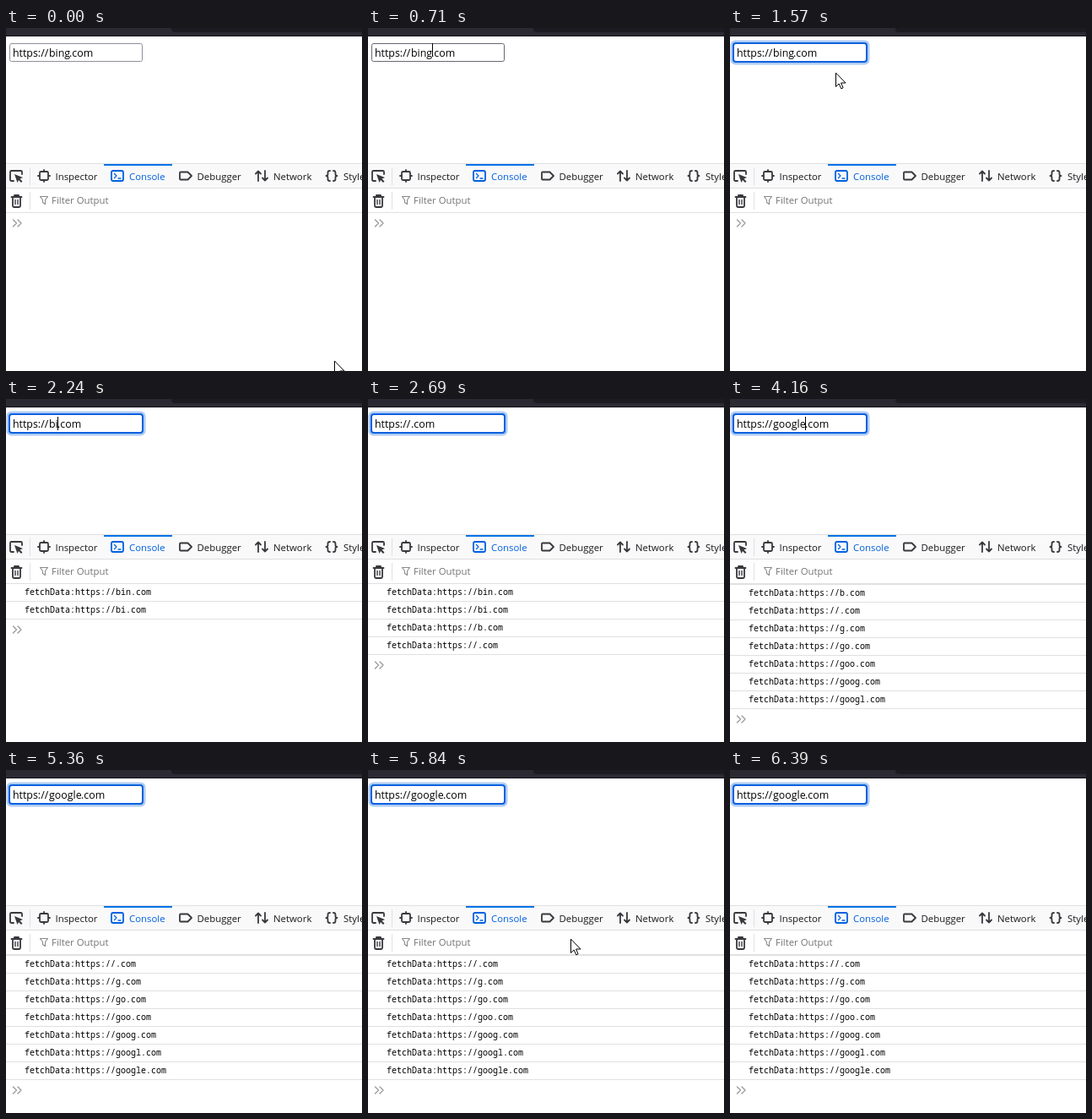
An HTML page with a canvas that plays this animation: 422 by 406 pixels, repeating every 6.93 s.

```html
<!DOCTYPE html>
<html lang="en">
<head>
<meta charset="utf-8">
<title>Console typing demo</title>
<style>
html, body { margin: 0; width: 100%; height: 100%; overflow: hidden; background: #fff; }
canvas { display: block; width: 422px; height: 406px; }
</style>
</head>
<body>
<canvas id="stage" width="422" height="406"></canvas>
<script>
const ctx = document.getElementById('stage').getContext('2d');
const LOOP = 6930, ROW = 21;
const UI = '"Open Sans", "Noto Sans", sans-serif';
const MONO = '10px "Noto Sans Mono", "DejaVu Sans Mono", monospace';
const INK = '#38383d', LINE = '#e0e0e2', BLUE = '#0060df';

// [time, typed part of the address]
const edits = [
  [0, 'bing'], [2040, 'bin'], [2170, 'bi'], [2300, 'b'], [2570, ''],
  [3500, 'g'], [3700, 'go'], [3840, 'goo'], [3960, 'goog'], [4100, 'googl'], [4160, 'google']
];
const logTimes = [2110, 2240, 2430, 2690, 3600, 3840, 3960, 4030, 4160, 4300];
const caretFlips = [1040, 1570, 2040, 2690, 3180, 4300, 4830, 5360, 5890, 6390];

// [time, x, y, shape]; each pose holds until the next one
const pointer = [[0, 389, 394, 'arrow']];
const ease = p => p * p * (3 - 2 * p);

function glide(start, gap, steps, x, y) {
  const [, x0, y0] = pointer[pointer.length - 1];
  for (let k = 1; k <= steps; k++) {
    const e = ease(k / steps);
    pointer.push([start + (k - 1) * gap, x0 + (x - x0) * e, y0 + (y - y0) * e, 'arrow']);
  }
}
glide(70, 60, 7, 92, 8);
pointer.push(
  [570, 88, 12, 'arrow'], [640, 82, 28, 'beam'], [710, 76, 18, 'beam'],
  [770, 75, 19, 'beam'], [830, 75, 20, 'beam'],
  [1110, 90, 27, 'beam'], [1170, 112, 45, 'arrow'], [1240, 125, 53, 'arrow'],
  [2040, 125, 53, 'none'], [5430, 125, 53, 'arrow']
);
glide(5500, 67, 4, 215, 229);
glide(5770, 67, 5, 285, 146);
pointer.push([6100, 292, 190, 'arrow'], [6160, 353, 307, 'arrow'], [6230, 353, 307, 'none']);

const lastBefore = (list, t) => list.filter(k => k[0] <= t).pop();
const countBefore = (list, t) => list.filter(k => k <= t).length;

function box(x, y, w, h, color) {
  ctx.fillStyle = color;
  ctx.fillRect(x, y, w, h);
}

function text(str, x, y, font, color) {
  ctx.font = font;
  ctx.fillStyle = color;
  ctx.fillText(str, x, y);
}

function stroke(path, color = INK, width = 2) {
  ctx.strokeStyle = color;
  ctx.lineWidth = width;
  ctx.stroke(new Path2D(path));
}

function round(x, y, w, h, r) {
  ctx.beginPath();
  ctx.roundRect(x, y, w, h, r);
}

function roundFill(x, y, w, h, r, color) {
  round(x, y, w, h, r);
  ctx.fillStyle = color;
  ctx.fill();
}

function roundLine(x, y, w, h, r, color, width) {
  round(x, y, w, h, r);
  ctx.strokeStyle = color;
  ctx.lineWidth = width;
  ctx.stroke();
}

function drawBrowserBar() {
  box(0, 0, 422, 10, '#2b2a33');
  roundFill(196, -8, 240, 13, 4, '#1c1b22');
  box(0, 9, 422, 1, '#15141a');
}

function drawInput(mid, focused, hover, caret) {
  if (focused) {
    roundFill(0.5, 14.5, 165, 29, 6, '#b0cbf3');
    roundFill(3, 17, 160, 24, 4, BLUE);
    roundFill(5, 19, 156, 20, 2, '#fff');
  } else {
    roundLine(4.5, 18.5, 157, 21, 2, hover ? '#676774' : '#8f8f9d', 1);
  }
  const font = '12.4px ' + UI;
  ctx.font = font;
  const end = mid ? 51 + Math.floor(ctx.measureText(mid).width - 0.5) : 51;
  text('https://', 8, 34, font, '#000');
  text(mid, 51, 34, font, '#000');
  text('.com', end, 34, font, '#000');
  if (caret) box(end, 21, 1, 16, '#000');
}

function drawIcons() {
  ctx.lineCap = ctx.lineJoin = 'round';
  // element picker
  stroke('M9 181H6.5Q5 181 5 179.500V170.500Q5 169 6.500 169H17.500Q19 169 19 170.500V173', INK, 1.8);
  ctx.fillStyle = INK;
  ctx.fill(new Path2D('M10 173L20 177L16.500 178.500L19.500 181.500L18 183L15 180L13.500 183Z'));
  // inspector
  roundLine(40, 170, 10, 10, 1.5, INK, 1.8);
  stroke('M45 168V169M45 181V182M38 175H39M51 175H52', INK, 1.8);
  // console
  roundLine(125, 169, 14, 12, 2, BLUE, 1.8);
  stroke('M128.500 172.500L131 175L128.500 177.500M133 178H136', BLUE, 1.3);
  // debugger
  stroke('M207 170.500H215.500L220 175L215.500 179.500H207Q206 179.500 206 178.500V171.500Q206 170.500 207 170.500Z', INK, 1.8);
  // network
  stroke('M299 181V169.500M296 172.500L299 169.500L302 172.500M307 169V180.500M304 177.500L307 180.500L310 177.500', INK, 1.8);
  // style editor
  stroke('M384 169Q381.500 169 381.500 171V173Q381.500 175 379.500 175Q381.500 175 381.500 177V179Q381.500 181 384 181' +
    'M388 169Q390.500 169 390.500 171V173Q390.500 175 392.500 175Q390.500 175 390.500 177V179Q390.500 181 388 181', INK, 1.8);
  // trash
  stroke('M6.500 200H18.500M10 199.500V198H15V199.500M8 201V210.500Q8 212 9.500 212H15.500Q17 212 17 210.500V201', INK, 1.8);
  stroke('M11 203.500V208.500M14 203.500V208.500', INK, 1.4);
  // filter
  stroke('M40.500 199.500H49.500L46.500 203.500V208.500L43.500 206.500V203.500Z', '#8a8a8e', 1.1);
}

function drawTools() {
  box(0, 160, 422, 30, '#f9f9fa');
  box(0, 160, 422, 1, LINE);
  box(0, 189, 422, 1, LINE);
  box(0, 218, 422, 1, LINE);
  box(28, 165, 1, 21, LINE);
  box(28, 194, 1, 21, LINE);
  box(116, 161, 81, 2, '#0074e8');
  const font = '11.4px ' + UI;
  const tabs = [['Inspector', 58.5], ['Console', 146], ['Debugger', 226.5], ['Network', 317], ['Style Editor', 400]];
  for (const [name, x] of tabs) text(name, x, 180, font, name === 'Console' ? BLUE : '#18181a');
  text('Filter Output', 54, 208, font, '#737373');
  drawIcons();
}

function drawLog(t) {
  const n = countBefore(logTimes, t);
  const scroll = Math.max(0, n * ROW - 148);
  ctx.save();
  ctx.beginPath();
  ctx.rect(0, 219, 422, 187);
  ctx.clip();
  for (let i = 0; i < n; i++) {
    const y = 219 + i * ROW - scroll;
    text('fetchData:https://' + edits[i + 1][1] + '.com', 22, y + 13, MONO, '#000');
    box(0, y + 20, 422, 1, LINE);
  }
  const y = 231 + n * ROW - scroll;
  ctx.lineCap = ctx.lineJoin = 'miter' && 'round';
  stroke(`M8.500 ${y - 4}L12.500 ${y}L8.500 ${y + 4}M14 ${y - 4}L18 ${y}L14 ${y + 4}`, '#a0a0a3', 1.5);
  ctx.restore();
}

function drawPointer([, x, y, shape]) {
  x = Math.round(x);
  y = Math.round(y);
  if (shape === 'beam') box(x, y, 1, 16, '#000');
  if (shape !== 'arrow') return;
  ctx.save();
  ctx.translate(x + 0.5, y + 0.5);
  ctx.lineJoin = 'miter';
  const arrow = 'M0 0V16L3.700 12.500L6.300 18.300L8.600 17.300L6.100 11.500H11.200Z';
  ctx.fillStyle = '#fff';
  ctx.fill(new Path2D(arrow));
  stroke(arrow, '#000', 1);
  ctx.restore();
}

function draw(t) {
  const pose = lastBefore(pointer, t);
  const [, x, y, shape] = pose;
  const hover = shape === 'beam' || (x > 4 && x < 162 && y > 18 && y < 40);
  box(0, 0, 422, 406, '#fff');
  drawBrowserBar();
  drawInput(lastBefore(edits, t)[1], t >= 1040, hover, countBefore(caretFlips, t) % 2 === 1);
  drawTools();
  drawLog(t);
  drawPointer(pose);
}

const begin = performance.now();
function tick() {
  draw((performance.now() - begin) % LOOP);
  requestAnimationFrame(tick);
}
tick();
</script>
</body>
</html>
```
